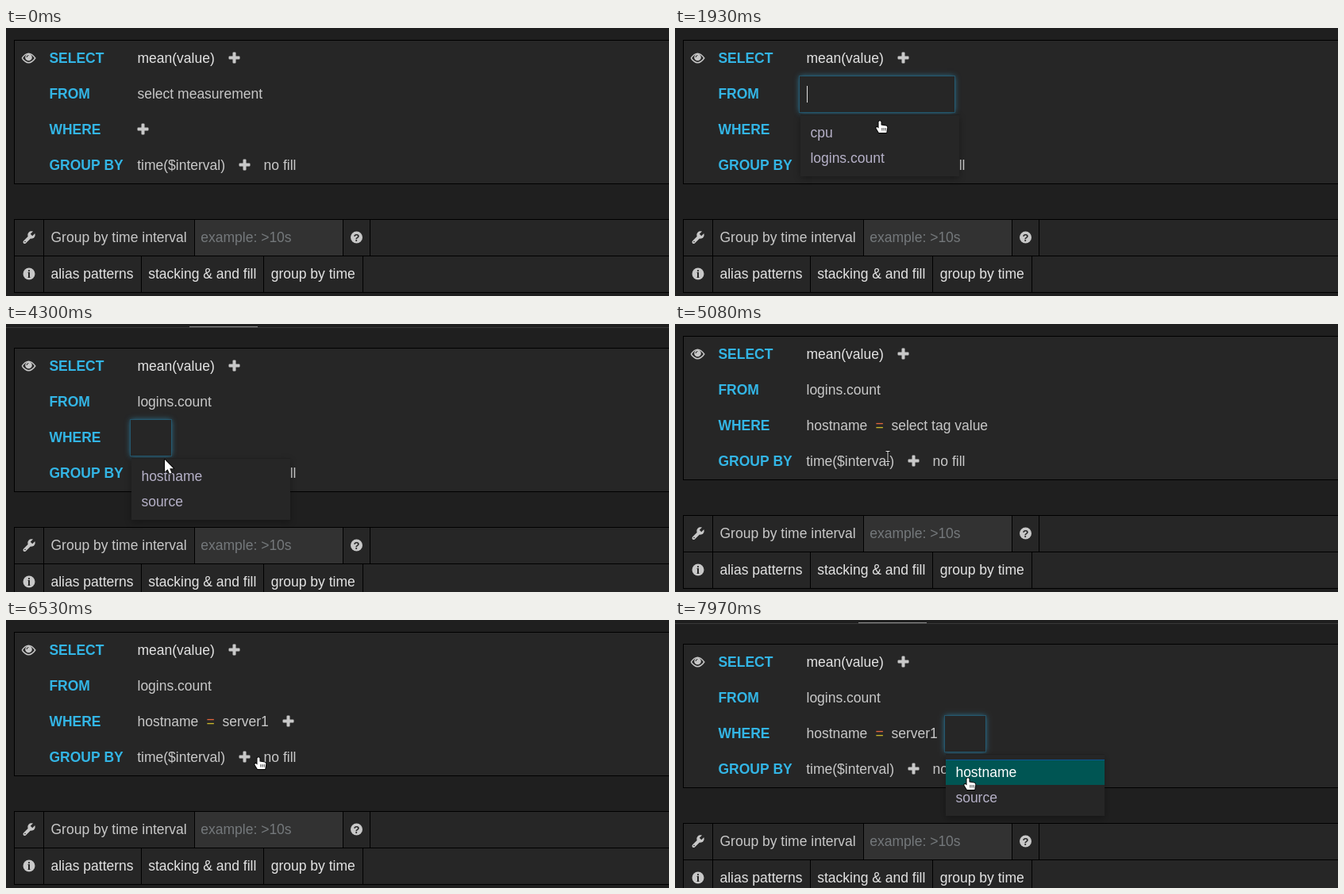
Recreate the animation shown at these times as an HTML page with a canvas. Size 835x338 px, loop 8000 ms.

```html
<!DOCTYPE html>
<html lang="en">
<head>
<meta charset="utf-8">
<title>Query editor</title>
<style>
  html, body { margin: 0; width: 100%; height: 100%; overflow: hidden; background: #1f1f1f; }
  canvas { display: block; width: 835px; height: 338px; }
</style>
</head>
<body>
<canvas id="stage"></canvas>
<script>
const W = 835, H = 338, LOOP = 8000;
const cv = document.getElementById('stage');
const dpr = window.devicePixelRatio || 1;
cv.width = W * dpr;
cv.height = H * dpr;
const c = cv.getContext('2d');

const SANS = '"Liberation Sans", Arial, sans-serif';
const PAGE = '#1f1f1f', PANEL = '#262626', LINE = '#000';
const TEXT = '#c8c8c8', BRIGHT = '#e3e3e3', BLUE = '#33b5e5';

// pointer path: time, x, y
const path = [
  [300, 250, 102], [1060, 278, 79], [1150, 279, 77], [1590, 279, 80],
  [1930, 258, 117], [2370, 212, 162], [2460, 212, 162], [2630, 212, 160],
  [3230, 175, 144], [3430, 173, 143], [3980, 173, 143], [4300, 200, 171],
  [4680, 221, 187], [4820, 221, 187], [5080, 268, 167], [5600, 330, 129],
  [5960, 330, 129], [6400, 318, 173], [6780, 318, 173], [7320, 355, 142],
  [7670, 355, 142], [7950, 369, 199]
];
const shapes = [
  [300, 'hand'], [1600, 'beam'], [1820, 'arrow'], [1900, 'hand'], [2500, 'arrow'],
  [3060, 'hand'], [3640, 'beam'], [4210, 'arrow'], [4330, 'hand'], [4900, 'beam'],
  [5320, 'hand'], [5680, 'beam'], [6150, 'arrow'], [6220, 'hand'], [7470, 'beam'],
  [7780, 'arrow'], [7830, 'hand']
];
// inline editors: focus, list shown, closed, row, left edge, width, choices
const edits = [
  { on: 1590, list: 1690, off: 2460, row: 1, x: 157, w: 195, items: ['cpu', 'logins.count'] },
  { on: 3610, list: 3700, off: 4820, row: 2, x: 157, w: 51, items: ['hostname', 'source'] },
  { on: 5650, list: 5960, off: 6450, row: 2, x: 264, w: 157, items: ['server1'] },
  { on: 7450, list: 7530, off: 9000, row: 2, x: 340, w: 51, items: ['hostname', 'source'] }
];

const scrollAt = t => (t >= 2590 && t < 4960) || t >= 6620 ? 15 : 0;

function pointerAt(t) {
  if (t < path[0][0]) return null;
  let i = path.length - 1;
  while (path[i][0] > t) i--;
  const a = path[i], b = path[i + 1] || a;
  let k = b === a ? 0 : (t - a[0]) / (b[0] - a[0]);
  k = k * k * (3 - 2 * k);
  return {
    x: Math.round(a[1] + (b[1] - a[1]) * k),
    y: Math.round(a[2] + (b[2] - a[2]) * k),
    kind: shapes.filter(s => s[0] <= t).pop()[1]
  };
}

function rect(x, y, w, h, fill) {
  c.fillStyle = fill;
  c.fillRect(x, y, w, h);
}

function text(s, x, y, fill = TEXT, font = '17.5px ' + SANS) {
  c.font = font;
  c.fillStyle = fill;
  c.fillText(s, x, y);
}

function dot(x, y, r, fill) {
  c.fillStyle = fill;
  c.beginPath();
  c.arc(x, y, r, 0, 7);
  c.fill();
}

function stroke(color, width, pts) {
  c.strokeStyle = color;
  c.lineWidth = width;
  c.beginPath();
  pts.forEach(p => c.lineTo(p[0], p[1]));
  c.stroke();
}

function plus(x, y, hover) {
  c.fillStyle = hover ? '#fff' : TEXT;
  c.beginPath();
  c.roundRect(x - 7, y - 2, 14, 4, 1);
  c.roundRect(x - 2, y - 7, 4, 14, 1);
  c.fill();
}

function eye(x, y) {
  c.strokeStyle = TEXT;
  c.lineWidth = 1.4;
  c.beginPath();
  c.moveTo(x - 8.3, y);
  c.quadraticCurveTo(x, y - 11.5, x + 8.3, y);
  c.quadraticCurveTo(x, y + 11.5, x - 8.3, y);
  c.stroke();
  dot(x, y - 1, 4.3, TEXT);
  c.strokeStyle = PANEL;
  c.lineWidth = 1;
  c.beginPath();
  c.arc(x, y - 1, 2.4, Math.PI, Math.PI * 1.5);
  c.stroke();
}

function wrench(x, y) {
  c.lineCap = 'round';
  stroke(TEXT, 4, [[x - 5.5, y + 6], [x + 2, y - 1.5]]);
  dot(x + 3, y - 3, 4.7, TEXT);
  c.lineCap = 'butt';
  stroke(PANEL, 3.6, [[x + 3, y - 3], [x + 9, y - 9]]);
  dot(x - 5, y + 5.5, 0.8, PANEL);
}

function badge(x, y, sign, font) {
  dot(x, y, 7.5, TEXT);
  c.textAlign = 'center';
  text(sign, x, y + 4.5, PANEL, font);
  c.textAlign = 'left';
}

function keyword(s, row) {
  text(s, 54.4, 44 + 45 * row, BLUE, 'bold 17.5px ' + SANS);
}

function equals(x, y) {
  const g = c.createLinearGradient(0, y - 7, 0, y - 4);
  g.addColorStop(0.4, '#e0643c');
  g.addColorStop(0.6, '#c9b82a');
  text('=', x, y, g);
}

function queryRows(t) {
  rect(10, 15, W, 182, LINE);
  rect(11, 16, W, 180, PANEL);
  eye(28.5, 38);
  ['SELECT', 'FROM', 'WHERE', 'GROUP BY'].forEach(keyword);
  text('mean(value)', 165.5, 44, BRIGHT);
  plus(287.5, 37.5);

  const hover = t >= 300 && t < 1590;
  if (t < 1590) text('select measurement', 165.5, 89, hover ? '#fff' : TEXT);
  else if (t >= 2460) text('logins.count', 165.5, 89);

  if (t < 3610) {
    plus(172.5, 127.5, t >= 3060);
  } else if (t >= 4820) {
    text('hostname', 165.5, 134);
    equals(252.5, 134);
    if (t < 5650) text('select tag value', 272.5, 134, t >= 5400 ? '#fff' : TEXT);
    else if (t >= 6450) {
      text('server1', 272.5, 134);
      if (t < 7450) plus(355.5, 127.5, t >= 7180);
    }
  }

  text('time($interval)', 165.2, 179);
  plus(300.5, 172.5);
  text('no fill', 324.6, 179);
}

function options() {
  rect(10, 241, W, 93, LINE);
  rect(11, 242, W, 45, PANEL);
  rect(11, 288, W, 45, PANEL);
  rect(238, 242, 186, 45, '#323232');
  [47, 237, 424, 458].forEach(x => rect(x, 242, 1, 45, LINE));
  [47, 170, 324, 449].forEach(x => rect(x, 288, 1, 45, LINE));
  wrench(29, 264);
  text('Group by time interval', 56.5, 270);
  text('example: >10s', 245.3, 270, '#74787b');
  badge(441.5, 264, '?', 'bold 13px ' + SANS);
  badge(29, 310, 'i', 'bold 14px "Liberation Serif", Times, serif');
  text('alias patterns', 56.5, 316, BRIGHT);
  text('stacking & and fill', 179.2, 316, BRIGHT);
  text('group by time', 333.7, 316, BRIGHT);
}

function dropdown(e, y, mouse) {
  const x = e.x + 1, h = e.items.length * 32 + 14;
  c.save();
  c.shadowColor = 'rgba(0,0,0,.3)';
  c.shadowBlur = 8 * dpr;
  c.shadowOffsetY = 3 * dpr;
  rect(x, y, 200, h, PANEL);
  c.restore();
  rect(x, y, 200, 1, '#202020');
  e.items.forEach((s, i) => {
    const top = y + 7 + 32 * i;
    const hot = mouse.kind === 'hand' && mouse.x > x &&
      mouse.y > top + 2 && mouse.y <= top + 34;
    if (hot) {
      rect(x, top, 200, 32, '#005553');
      rect(x, top, 200, 1, '#0a5796');
    }
    text(s, x + 12.4, top + 22, hot ? '#fff' : '#b6b1c8');
  });
}

function editor(e, t, mouse, scroll) {
  const y = 61 + 45 * (e.row - 1);
  const glow = Math.min(1, (t - e.on + 30) / 180, Math.max(0, (e.off - 20 - t) / 120));
  c.save();
  c.shadowColor = `rgba(50,160,210,${0.75 * glow})`;
  c.shadowBlur = 7 * dpr;
  rect(e.x, y, e.w, 45, PANEL);
  c.restore();
  c.strokeStyle = `rgba(35,95,120,${0.7 * glow})`;
  c.lineWidth = 1;
  c.strokeRect(e.x - 0.5, y - 0.5, e.w + 1, 46);
  if ((t - e.on) % 1000 < 500) rect(e.x + 9, y + 12, 1, 21, '#e0e0e0');
  if (t >= e.list) dropdown(e, y + 48, { ...mouse, y: mouse.y - scroll });
}

const OUTLINE = {
  arrow: 'M0 0V15.5L3.6 12.2L6 17.8L8.6 16.7L6.2 11.2H11Z',
  hand: 'M-1.5 1.2Q0 -.6 1.5 1.2V5.5L8 6.6Q9.4 7 9.3 8.5L8.3 15H-1.2L-4.6 9.6Q-5 8 -3.4 8L-1.5 9.4Z'
};

function pointer(m) {
  c.save();
  c.translate(m.x, m.y);
  if (m.kind === 'beam') {
    for (const [col, w] of [['#111', 3], ['#e8e8e8', 1]]) {
      stroke(col, w, [[0, -6.5], [0, 6.5]]);
      stroke(col, w, [[-2.5, -6.5], [2.5, -6.5]]);
      stroke(col, w, [[-2.5, 6.5], [2.5, 6.5]]);
    }
  } else {
    const p = new Path2D(OUTLINE[m.kind]);
    c.lineJoin = 'round';
    c.strokeStyle = '#000';
    c.lineWidth = 1.8;
    c.stroke(p);
    c.fillStyle = '#fff';
    c.fill(p);
    if (m.kind === 'hand') {
      [2.4, 4.6, 6.8].forEach(x => rect(x, 9, 0.9, 3.5, '#333'));
    }
  }
  c.restore();
}

function draw(t) {
  const scroll = scrollAt(t), mouse = pointerAt(t);
  c.setTransform(dpr, 0, 0, dpr, 0, 0);
  rect(0, 0, W, H, PAGE);
  c.save();
  c.translate(0, scroll);
  rect(0, -11, W, 1, '#383838');
  rect(231, -12, 86, 1, '#8e8e8e');
  queryRows(t);
  options();
  const e = edits.find(e => t >= e.on && t < e.off);
  if (e) editor(e, t, mouse, scroll);
  c.restore();
  if (mouse) pointer(mouse);
}

let start;
function tick(now) {
  if (start === undefined) start = now;
  draw((now - start) % LOOP);
  requestAnimationFrame(tick);
}
draw(0);
requestAnimationFrame(tick);
</script>
</body>
</html>
```
